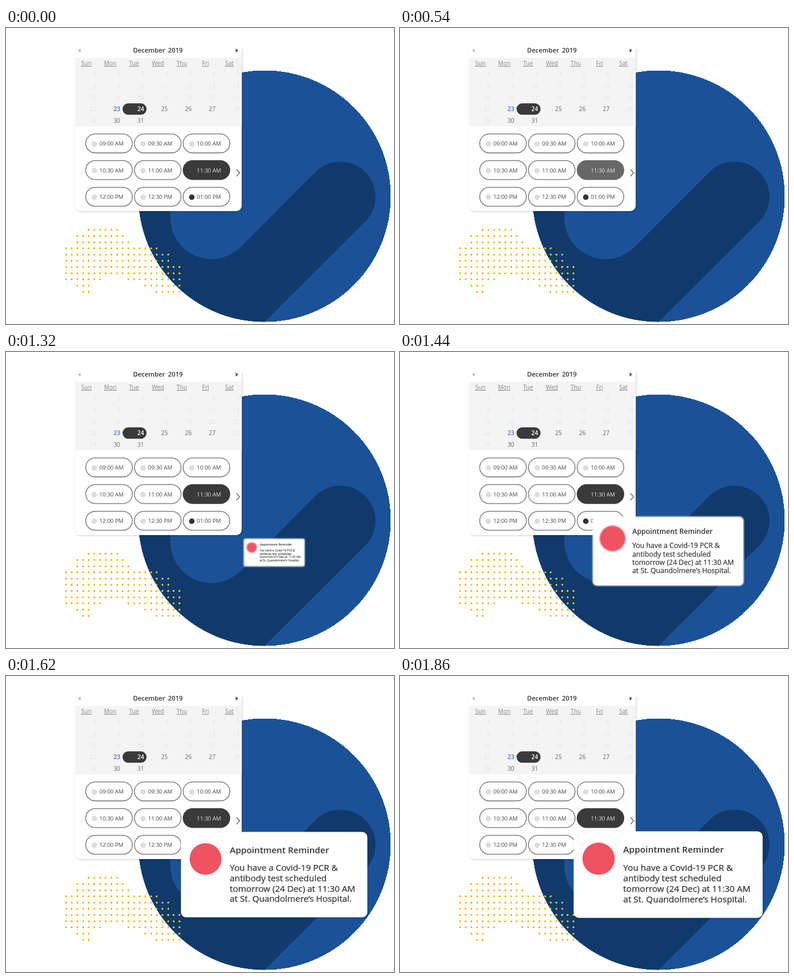
Write an HTML page that moves like this. It is 661 px wide and 506 px high and loops after 5.4 s.

```html
<!DOCTYPE html>
<html lang="en">
<head>
<meta charset="utf-8">
<title>Appointment booking</title>
<style>
  html, body { margin: 0; width: 100%; height: 100%; overflow: hidden; background: #fff; }
  svg { display: block; width: 661px; height: 506px; font-family: "Open Sans", sans-serif; }
  .crisp { shape-rendering: crispEdges; }
  .panel { filter: drop-shadow(1px 1px 1.5px rgba(0, 0, 0, .2)); }
  .title { font-weight: 600; fill: #333; }
  .weekday { font-size: 10px; fill: #858585; text-anchor: middle; text-decoration: underline; }
  .day { font-size: 10px; fill: #666; text-anchor: end; }
  .past { fill: #e2e2e2; }
  .today { fill: #2f7ad9; font-weight: 600; }
  .chosen { fill: #fff; font-weight: 600; }
  .slot { fill: #fff; stroke: #717171; stroke-width: 1.3; }
  .time { font-size: 9.5px; fill: #444; }
  .picked { fill: #e4e4e4; }
  .body { font-size: 15px; fill: #333; stroke: #333; stroke-width: .25; }
</style>
</head>
<body>
<svg viewBox="0 0 661 506">
  <circle class="crisp" cx="440.5" cy="287.5" r="215" fill="#1b5297"/>
  <path fill="#103a6c" d="M280 325A70 70 0 0 0 399.5 374.5L528.6 244.6A60 60 0 0 1 613.4 329.4L440.5 502.5A215 215 0 0 1 225.5 287.5H280Z"/>
  <g id="dots" class="crisp" fill="#e9c022"></g>

  <path class="panel" fill="#fff" d="M117 33H401.5V304a9 9 0 0 1-9 9H126a9 9 0 0 1-9-9Z"/>
  <rect x="116" y="26" width="287" height="10" fill="#fff"/>
  <rect x="118" y="51" width="283.5" height="117" fill="#f4f4f4"/>
  <path d="M127 35v7l-4-3.5z" fill="#b8b8b8"/>
  <path d="M391.3 35v7l4.4-3.5z" fill="#555"/>
  <text class="title" x="258.7" y="42.3" font-size="11" word-spacing="2" text-anchor="middle">December 2019</text>
  <g id="calendar"></g>
  <g id="slots"></g>
  <path d="M392.5 241.5l5.5 6-5.5 6" fill="none" stroke="#666" stroke-width="1.3"/>

  <g id="notice">
    <g id="shapes">
      <rect class="panel" x="295.5" y="265.5" width="322" height="148" rx="9" fill="#fff"/>
      <circle cx="338" cy="312.3" r="27.5" fill="#ef5361"/>
    </g>
    <text class="title" x="380" y="302" font-size="15.1">Appointment Reminder</text>
    <g class="body">
      <text x="380" y="333">You have a Covid-19 PCR &amp;</text>
      <text x="380" y="351">antibody test scheduled</text>
      <text x="380" y="369">tomorrow (24 Dec) at 11:30 AM</text>
      <text x="380" y="387">at St. Quandolmere’s Hospital.</text>
    </g>
  </g>
</svg>
<script>
const LOOP = 5400, STEP = 30;
const el = id => document.getElementById(id);
const text = (cls, x, y, s) => `<text class="${cls}" x="${x}" y="${y}">${s}</text>`;
const dot = (x, y, r, fill = 'inherit') => `<circle cx="${x}" cy="${y}" r="${r}" fill="${fill}"/>`;

// Column ranges of each dot row
const dotRows = ['4-9', '2-10', '2-11', '0-16', '0-18', '0-18', '0-20', '0-20', '0-6 11-20', '2-4 14-20', '3-4 16-20'];
let dots = '';
dotRows.forEach((row, j) => row.split(' ').forEach(range => {
  const [from, to] = range.split('-').map(Number);
  for (let i = from; i <= to; i++) dots += dot(102.3 + i * 9.66, 345 + j * 10.6, 1.7);
}));
el('dots').innerHTML = dots;

let calendar = '<rect x="198.5" y="128.8" width="41" height="19.5" rx="9.75" fill="#3a3a3a"/>';
['Sun', 'Mon', 'Tue', 'Wed', 'Thu', 'Fri', 'Sat'].forEach((name, i) => {
  calendar += text('weekday', 137 + i * 40.6, 64, name);
});
for (let day = 1; day <= 31; day++) {
  const col = (day - 1) % 7, row = Math.floor((day - 1) / 7);
  const state = day === 23 ? 'today' : day === 24 ? 'chosen' : day < 23 || day === 28 || day === 29 ? 'past' : '';
  calendar += text('day ' + state, 154 + col * 40.6, 83.2 + row * 19.75, day);
}
el('calendar').innerHTML = calendar;

const times = ['09:00 AM', '09:30 AM', '10:00 AM', '10:30 AM', '11:00 AM', '11:30 AM', '12:00 PM', '12:30 PM', '01:00 PM'];
el('slots').innerHTML = times.map((time, i) => {
  const x = 135.8 + i % 3 * 83, y = 181.1 + Math.floor(i / 3) * 45.6;
  const picked = time === '11:30 AM';
  return `<rect class="slot" ${picked ? 'id="picked"' : ''} x="${x}" y="${y}" width="79.5" height="32.4" rx="16.2"/>` +
    (picked ? '' : dot(x + 14.7, y + 17, 4.7, time === '01:00 PM' ? '#333' : '#dedede')) +
    text(picked ? 'time picked' : 'time', x + 23.2, y + 20, time);
}).join('');

const progress = (t, start, length) => Math.min(1, Math.max(0, (t - start) / length));
const easeOut = p => 1 - (1 - p) ** 5;

function draw(t) {
  // The picked slot lightens, then darkens again
  const light = t < 60 ? 0 : easeOut(progress(t, 15, 600)) * (1 - progress(t, 600, 180));
  const grey = Math.round(58 + 45 * light);
  el('picked').style.fill = el('picked').style.stroke = `rgb(${grey},${grey},${grey})`;

  // The notice pops up, its edges soft while it moves
  const scale = easeOut(progress(t, 1275, 600));
  const blur = 6 * (1 - scale);
  el('notice').style.display = t < 1320 ? 'none' : '';
  el('notice').setAttribute('transform', `translate(457 344.5) scale(${scale}) translate(-456.7 -344.5)`);
  el('shapes').style.filter = blur > .05 ? `blur(${blur}px)` : 'none';
}

function tick() {
  draw(Math.floor(performance.now() % LOOP / STEP) * STEP);
  requestAnimationFrame(tick);
}
tick();
</script>
</body>
</html>
```
